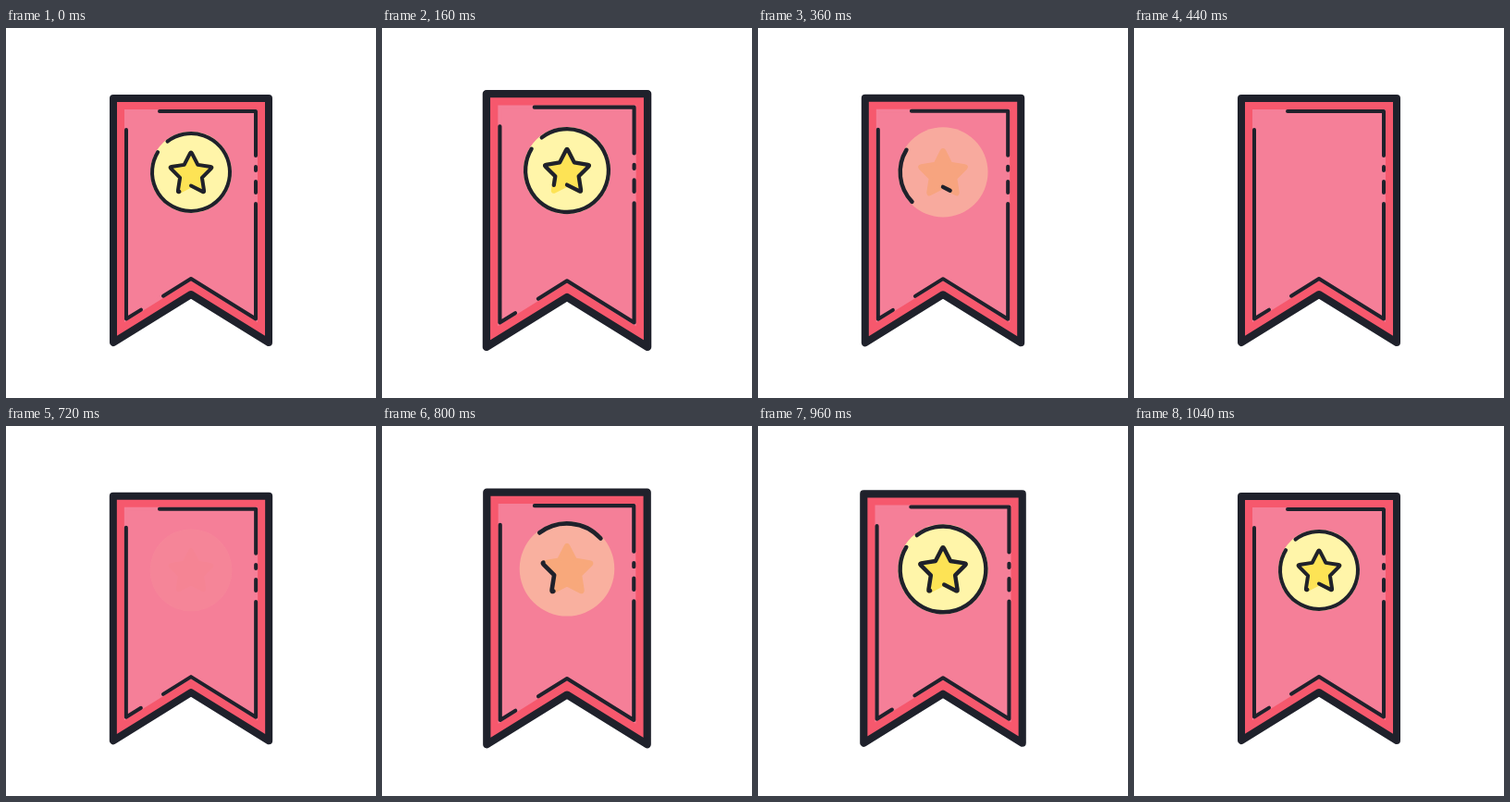
An HTML page that plays this animation: 400 by 400 pixels, repeating every 1.12 s.

```html
<!DOCTYPE html>
<html lang="en">
<head>
<meta charset="utf-8">
<title>Bookmark badge</title>
<style>
  html, body { margin: 0; width: 100%; height: 100%; overflow: hidden; background: #fff; }
  svg { display: block; width: 100vw; height: 100vh; }
  path, circle { stroke-linecap: round; stroke-linejoin: round; }
  .line { fill: none; stroke: #1f212b; stroke-width: 4; }
  .edge { fill: #f6586d; stroke: #1f212b; stroke-width: 8; }
  .cloth { fill: #f57f98; stroke: #f57f98; stroke-width: 4; stroke-linejoin: miter; }
  .disc { fill: #fff5a9; }
  .gold { fill: #fde355; stroke: #fde355; stroke-width: 4; }
</style>
</head>
<body>
<svg viewBox="0 0 400 400">
  <g id="banner">
    <path class="edge" d="M116 76H284V340L200 288L116 340Z"/>
    <path class="cloth" d="M130 90H270V314.5L200 271L130 314.5Z"/>
    <path class="line" d="M166 90H270V138M270 150V154M270 166V178M270 190V314.5L200 271L170 289.7M146 304.6L130 314.5V110"/>
    <g id="badge">
      <g id="fills">
        <circle class="disc" cx="200" cy="156" r="44"/>
        <path class="gold" id="starFill"/>
      </g>
      <path class="line" id="ring" pathLength="1"/>
      <path class="line" id="star" pathLength="1"/>
    </g>
  </g>
</svg>
<script>
const LOOP = 1120, STEP = 40;
const $ = id => document.getElementById(id);
const polar = (cx, cy, r, deg) => {
  const a = deg * Math.PI / 180;
  return [cx + r * Math.sin(a), cy - r * Math.cos(a)];
};
const mix = (a, b, k) => a.map((v, i) => v + (b[i] - v) * k);
const at = p => p.map(v => v.toFixed(2)).join(' ');

// Star outline with softened tips, clockwise from the lower left tip.
function starPath(closed) {
  const point = i => polar(200, 158, i % 2 ? 12.5 : 24.5, 216 + i * 36);
  let d = '';
  for (let i = 0; i < 10; i += 2) {
    const tip = point(i), cut = 0.13;
    d += (i ? 'L' : 'M') + at(mix(tip, point(i - 1), cut)) +
         'Q' + at(tip) + ' ' + at(mix(tip, point(i + 1), cut)) +
         'L' + at(point(i + 1));
  }
  return d + (closed ? 'Z' : '');
}

$('starFill').setAttribute('d', starPath(true));
$('star').setAttribute('d', starPath(false));
$('ring').setAttribute('d', 'M' + at(polar(200, 156, 42, -37.4)) +
  'A42 42 0 1 1 ' + at(polar(200, 156, 42, 301.4)));

const linear = (t, a, b) => Math.min(1, Math.max(0, (t - a) / (b - a)));
const ease = (t, a, b) => {
  const k = linear(t, a, b);
  return k * k * (3 - 2 * k);
};
const bump = (t, a, peak, b) => ease(t, a, peak) - ease(t, peak, b);

function zoom(id, cy, s) {
  $(id).setAttribute('transform', `translate(200 ${cy}) scale(${s}) translate(-200 ${-cy})`);
}

function trim(id, from, to) {
  const len = to - from, el = $(id);
  el.style.visibility = len > 0.001 ? 'visible' : 'hidden';
  el.setAttribute('stroke-dasharray', `${Math.max(len, 0.001)} 2`);
  el.setAttribute('stroke-dashoffset', -from);
}

function draw(t) {
  zoom('banner', 208, 1 + 0.05 * (bump(t, 80, 200, 385) + bump(t, 700, 867, 1033)));
  zoom('badge', 156, 1 + 0.2 * (bump(t, 120, 280, 440) + bump(t, 700, 867, 1033)));
  $('fills').setAttribute('opacity', 1 - linear(t, 222, 440) + linear(t, 708, 930));
  const back = t >= 600;
  trim('ring', back ? 0 : ease(t, 200, 430), back ? ease(t, 720, 964) : 1);
  trim('star', back ? 0 : ease(t, 120, 400), back ? ease(t, 720, 974) : 1);
}

const start = performance.now();
function tick() {
  const t = (performance.now() - start) % LOOP;
  draw(Math.floor(t / STEP) * STEP);
  requestAnimationFrame(tick);
}
tick();
</script>
</body>
</html>
```
